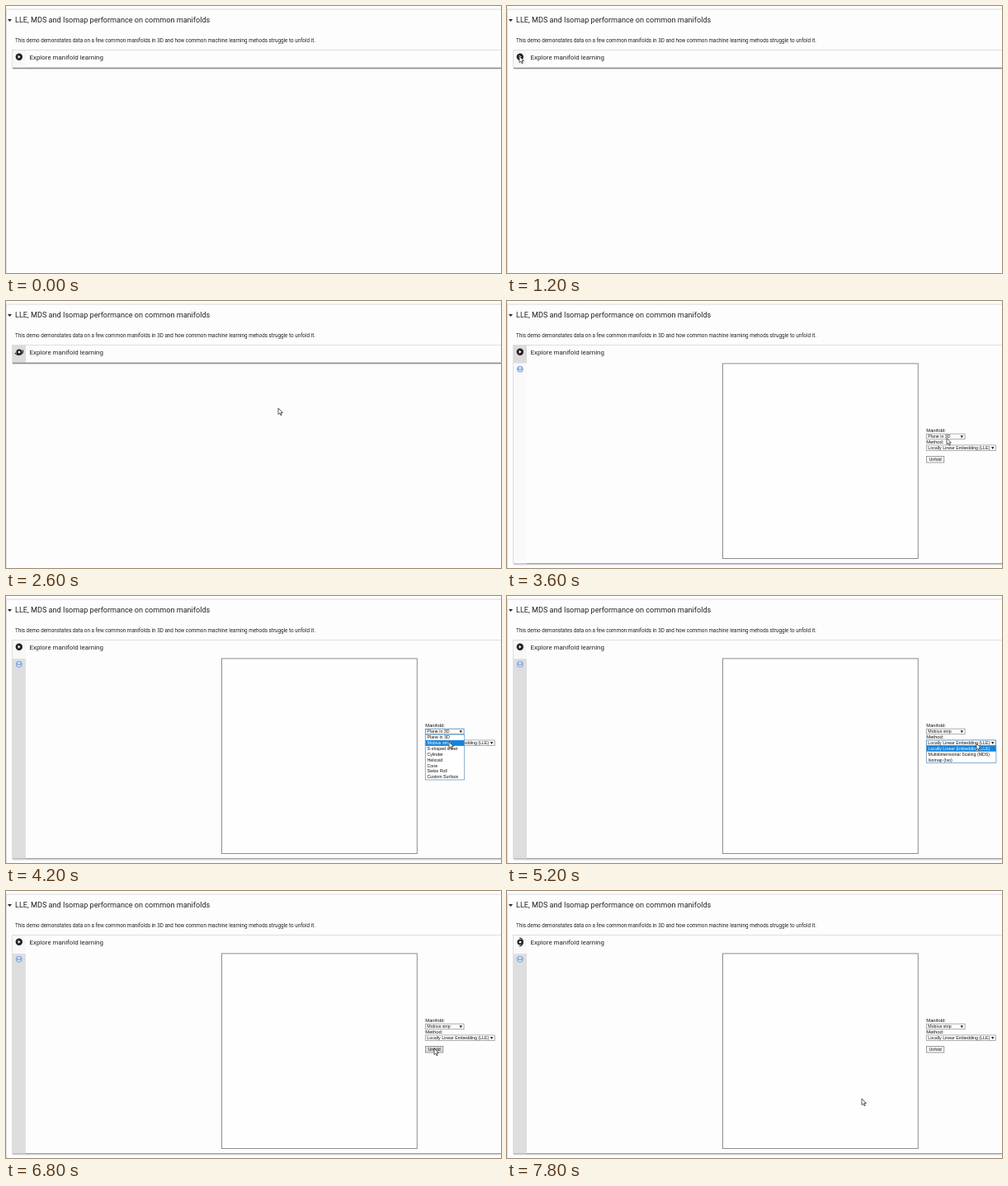
Recreate the animation shown at these times as an HTML page. Size 600 px wide and 324 px high, loop 8000 ms.

```html
<!DOCTYPE html>
<html lang="en">
<head>
<meta charset="utf-8">
<title>Manifold learning demo</title>
<style>
  html, body { margin: 0; width: 100%; height: 100%; overflow: hidden; background: #fdfdfd; }
  svg { display: block; width: 100%; height: 100%; }
  text { font-family: Roboto, sans-serif; fill: #222; }
  .form text { font: 5.27px "Liberation Sans", Arial, sans-serif; fill: #111; }
  .form .label { font-size: 5.8px; }
  .form .picked { fill: #fff; }
</style>
</head>
<body>
<svg viewBox="0 0 600 324">
  <rect width="600" height="324" fill="#fdfdfd"/>
  <path d="M0 4H600" stroke="#dadada"/>
  <path d="M.5 4V324" stroke="#dcdcdc"/>
  <path d="M2 16h5l-2.5 3z" fill="#222"/>
  <text x="11" y="20.3" font-size="9.1">LLE, MDS and Isomap performance on common manifolds</text>
  <text x="11" y="44" font-size="6.32">This demo demonstates data on a few common manifolds in 3D and how common machine learning mehods struggle to unfold it.</text>

  <g id="cell">
    <rect id="frame" x="7.5" y="53.5" width="600" fill="#fdfdfd" stroke="#dedede"/>
    <rect id="gutter" x="8" y="54" width="16" height="21.5"/>
    <path id="shadow" d="M8 .3H600" stroke="#8d8d8d" stroke-width="1.2"/>
    <path id="shadowSoft" d="M8 1.5H600" stroke="#d9d9d9"/>
    <text x="28.5" y="64.6" font-size="7.92">Explore manifold learning</text>
  </g>

  <g id="play">
    <circle cx="15.8" cy="61.8" r="4.2" fill="#222"/>
    <path d="M14.6 59.8v4l3-2z" fill="#fff"/>
  </g>
  <g id="stop">
    <circle cx="16" cy="62" r="3.6" fill="#222"/>
    <rect x="14.8" y="60.8" width="2.4" height="2.4" fill="#fff"/>
    <path id="arc" d="M10.9 62.9A5.2 5.2 0 0 1 21.1 62.9" fill="none" stroke="#333" stroke-width="1.3"/>
  </g>

  <g id="output">
    <rect id="outGutter" x="8" y="76" width="16" height="242.5"/>
    <circle cx="15.8" cy="82.7" r="4" fill="#8fb1e2"/>
    <circle cx="15.8" cy="81.3" r="1.3" fill="#e8f0fb"/>
    <path d="M13 85.2q2.8-3 5.6 0z" fill="#e8f0fb"/>
    <rect x="261.5" y="75.9" width="236.8" height="236.6" fill="#fefefe" stroke="#8b8d90"/>
    <g id="form" class="form"></g>
  </g>

  <path id="cursor" d="M0 0V7.6L1.8 6L3 8.8L4.3 8.2L3.1 5.5H5.4Z" fill="#fff" stroke="#333" stroke-width=".8"/>
</svg>
<script>
const LOOP = 8000, STEP = 200, ROW = 6.83;
const MANIFOLDS = ["Plane in 3D", "Mobius strip", "S-shaped sheet", "Cylinder",
  "Helicoid", "Cone", "Swiss Roll", "Custom Surface"];
const METHODS = ["Locally Linear Embedding (LLE)", "Multidimensional Scaling (MDS)", "Isomap (Iso)"];

// time, x, y of the pointer tip
const POINTER = [
  [200, 366, 259], [1200, 15, 61], [1600, 15, 61], [2200, 220, 116], [2600, 330, 130],
  [3400, 533, 166], [3800, 533, 167], [4200, 537, 177], [4400, 537, 177], [5000, 569, 178],
  [5200, 569, 179], [6000, 569, 187], [6200, 569, 184], [6800, 519, 191], [7000, 519, 191],
  [7200, 505, 268], [7600, 450, 290], [7800, 430, 252]
];

const el = id => document.getElementById(id);
const set = (id, name, value) => el(id).setAttribute(name, value);
const show = (id, on) => set(id, "visibility", on ? "visible" : "hidden");
const between = (t, from, to) => t >= from && t < to;

const label = (x, y, text, cls = "") => `<text x="${x}" y="${y}" class="${cls}">${text}</text>`;
const box = (x, y, w, h, fill, stroke) =>
  `<rect x="${x}" y="${y}" width="${w}" height="${h}" fill="${fill}" stroke="${stroke}" stroke-width=".8"/>`;

function select(y, w, value, open) {
  const arrowX = 508.3 + w - 5.5;
  return box(508.3, y, w, 6.5, "#fff", open ? "#3f78b5" : "#999") +
    label(510.3, y + 5.1, value) +
    `<path d="M${arrowX} ${y + 2}h3.4l-1.7 3z" fill="#222"/>`;
}

function list(y, w, items, picked) {
  const rows = items.map((item, i) =>
    (i === picked ? box(509, y + i * ROW + .3, w - 1.4, ROW - .6, "#1483dc", "#1483dc") : "") +
    label(510.5, y + i * ROW + 5.3, item, i === picked ? "picked" : ""));
  return box(508.3, y, w, items.length * ROW + .3, "#fff", "#6f96bd") + rows.join("");
}

function form(t) {
  const manifold = t < 4600 ? 0 : 1;
  const manifoldOpen = between(t, 3800, 4600);
  const methodOpen = between(t, 5000, 6400);
  const pressed = between(t, 6800, 7200);
  return label(508.3, 159.2, "Manifold:", "label") +
    select(161.2, 46.8, MANIFOLDS[manifold], manifoldOpen) +
    label(508.3, 173, "Method:", "label") +
    select(174.9, 84.2, METHODS[0], methodOpen) +
    box(508.5, 188.4, 21.3, 7.6, pressed ? "#ddd" : "#f7f7f7", "#888") +
    label(511.5, 194.1, "Unfold") +
    (manifoldOpen ? list(168.1, 47.4, MANIFOLDS, t < 4200 ? 0 : 1) : "") +
    (methodOpen ? list(181.7, 84.6, METHODS, 0) : "");
}

function pointerAt(t) {
  const next = POINTER.findIndex(p => p[0] > t);
  if (next < 1) return POINTER[POINTER.length - 1].slice(1);
  const [t0, x0, y0] = POINTER[next - 1], [t1, x1, y1] = POINTER[next];
  const k = (t - t0) / (t1 - t0);
  return [x0 + (x1 - x0) * k, y0 + (y1 - y0) * k];
}

function draw(t) {
  const hasOutput = t >= 2800;
  const running = between(t, 1600, 2800) || t >= 7000;
  const bottom = hasOutput ? 318.5 : 75;

  set("frame", "height", bottom - 53.5);
  set("shadow", "transform", `translate(0 ${bottom})`);
  set("shadowSoft", "transform", `translate(0 ${bottom})`);
  set("gutter", "fill", between(t, 1400, 3800) ? "#dcdcdc" : "#f8f8f8");
  set("outGutter", "fill", t >= 3800 ? "#dedede" : "#fafafa");
  show("output", hasOutput);
  show("play", !running);
  show("stop", running);
  set("arc", "transform", `rotate(${(t - 2200) * 2250 / 5600} 16 62)`);
  el("form").innerHTML = hasOutput ? form(t) : "";

  show("cursor", t >= 200);
  set("cursor", "transform", `translate(${pointerAt(t)})`);
}

let shown = -1;
function tick() {
  const t = Math.floor(performance.now() % LOOP / STEP) * STEP;
  if (t !== shown) draw(shown = t);
  requestAnimationFrame(tick);
}
tick();
</script>
</body>
</html>
```
